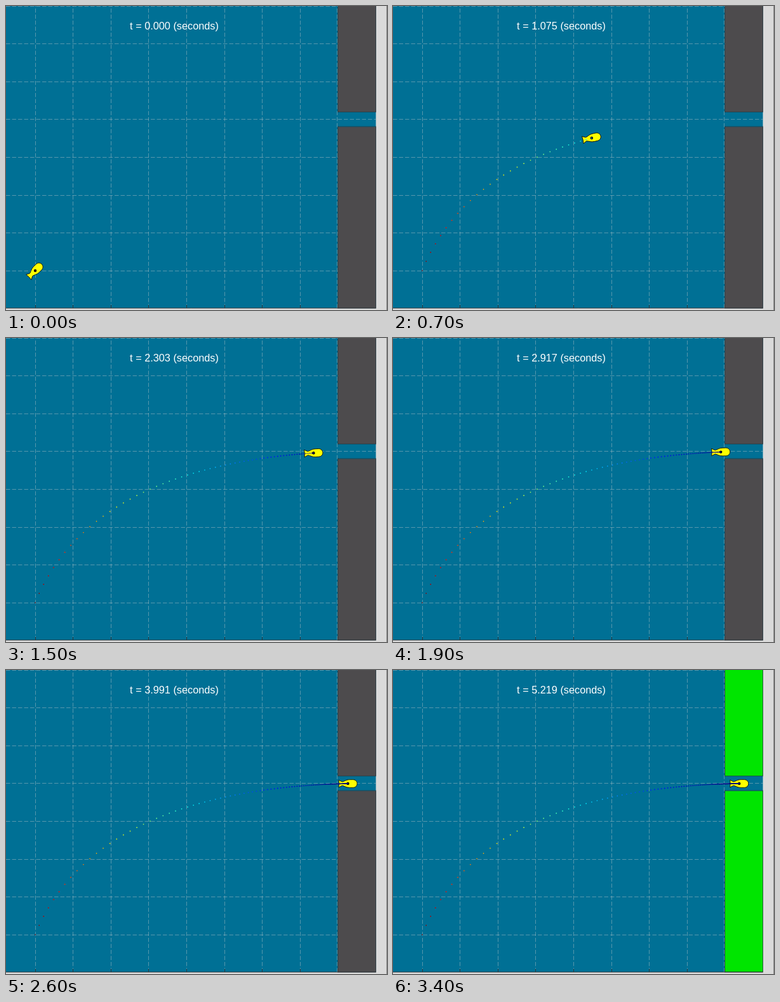
Animation, 600 px wide and 479 px high, one loop 3500 ms. Source, as an HTML page with a canvas:

```html
<!DOCTYPE html>
<html lang="en">
<head>
<meta charset="utf-8">
<title>Docking run</title>
<style>
html, body { margin: 0; width: 100%; height: 100%; overflow: hidden; background: #dadada; }
canvas { display: block; }
</style>
</head>
<body>
<canvas id="stage" width="600" height="479"></canvas>
<script>
const ctx = document.getElementById('stage').getContext('2d');
const FRAME = 100, FRAMES = 35, STEP = 0.153505, DOTS = 4, DOCKED = 29;
const CELL = 59.6, WALL = 523, RIGHT = 582.5, BOTTOM = 476;
const GATE_TOP = 167, GATE_BOTTOM = 190.5;
const START = { x: 46, y: 417 }, GOAL = { x: 547.3, y: 179 };

const fish = new Path2D('M-14.5-5.8L-9-3C-5-3.8-3-6.3 3-6.3H8.3A6.3 6.3 0 0 1 8.3 6.3' +
  'H3C-3 6.3-5 3.8-9 3L-14.5 5.8Q-13.6 0-14.5-5.8Z');

// Distance left decays exponentially after a slower start.
const left = (t, rate, lag, k) => Math.exp(lag * (1 - Math.exp(-k * t)) - rate * t);

function pose(t) {
  return {
    x: GOAL.x + (START.x - GOAL.x) * left(t, 1.18, 0.677, 1.29),
    y: GOAL.y + (START.y - GOAL.y) * left(t, 2.1, 0.157, 3),
    angle: -Math.PI / 4 * Math.exp(-1.2 * t)
  };
}

function jet(v) {
  const part = c => Math.round(255 * Math.max(0, Math.min(1, 1.5 - Math.abs(4 * v - c))));
  return `rgb(${part(3)},${part(2)},${part(1)})`;
}

function rect(color, x1, y1, x2, y2) {
  ctx.fillStyle = color;
  ctx.fillRect(x1, y1, x2 - x1, y2 - y1);
}

function line(x1, y1, x2, y2) {
  ctx.beginPath();
  ctx.moveTo(x1, y1);
  ctx.lineTo(x2, y2);
  ctx.stroke();
}

function dot(x, y, r, color) {
  ctx.fillStyle = color;
  ctx.beginPath();
  ctx.arc(x, y, r, 0, 7);
  ctx.fill();
}

function drawWall(color, top, bottom) {
  rect(color, WALL, top, RIGHT, bottom);
  ctx.strokeStyle = 'rgba(40,50,55,.7)';
  ctx.strokeRect(WALL - 0.5, top - 0.5, RIGHT - WALL + 0.5, bottom - top + 0.5);
}

function drawScene(docked) {
  rect('#dadada', 0, 0, 600, 479);
  rect('#888', 599, 0, 600, 479);
  rect('#007095', 0, 0, RIGHT, BOTTOM);

  ctx.lineWidth = 1;
  const wall = docked ? '#00e500' : '#4d4b4d';
  drawWall(wall, 0, GATE_TOP);
  drawWall(wall, GATE_BOTTOM, BOTTOM);

  ctx.strokeStyle = 'rgba(205,205,205,.42)';
  ctx.setLineDash([6.5, 3]);
  for (let i = 0; i < 9; i++) {
    const x = Math.floor(46 + i * CELL) - (i === 8 ? 0.5 : -0.5);
    const y = Math.floor(i * CELL) + 0.5;
    line(x, BOTTOM, x, 0);
    if (i < 8) line(0, y, i === 3 ? RIGHT : WALL, y);
  }
  ctx.setLineDash([]);

  ctx.strokeStyle = '#30383c';
  line(0, BOTTOM, RIGHT, BOTTOM);
  for (let i = 0; i < 9; i++) {
    const x = Math.floor(46 + i * CELL) + 0.5;
    line(x, BOTTOM - 5, x, BOTTOM);
  }
}

function drawFish({ x, y, angle }) {
  ctx.save();
  ctx.translate(x, y);
  ctx.rotate(angle);
  ctx.fillStyle = '#ff0';
  ctx.strokeStyle = '#000';
  ctx.lineWidth = 0.8;
  ctx.fill(fish);
  ctx.stroke(fish);
  ctx.restore();
  dot(x, y, 2.2, '#000');
}

function draw(n) {
  const t = n * STEP;
  drawScene(n >= DOCKED);
  drawFish(pose(t));
  for (let i = 0; i <= n * DOTS; i++) {
    const s = i * STEP / DOTS, p = pose(s);
    dot(p.x, p.y, 0.85, jet(Math.exp(-0.7 * s - 0.3 * s * s)));
  }
  ctx.fillStyle = '#fff';
  ctx.font = '16.3px "Liberation Sans", Arial, sans-serif';
  ctx.textAlign = 'center';
  ctx.fillText(`t = ${t.toFixed(3)} (seconds)`, 265, 36.5);
}

const begin = performance.now();
function tick() {
  draw(Math.floor((performance.now() - begin) / FRAME) % FRAMES);
  requestAnimationFrame(tick);
}
tick();
</script>
</body>
</html>
```
